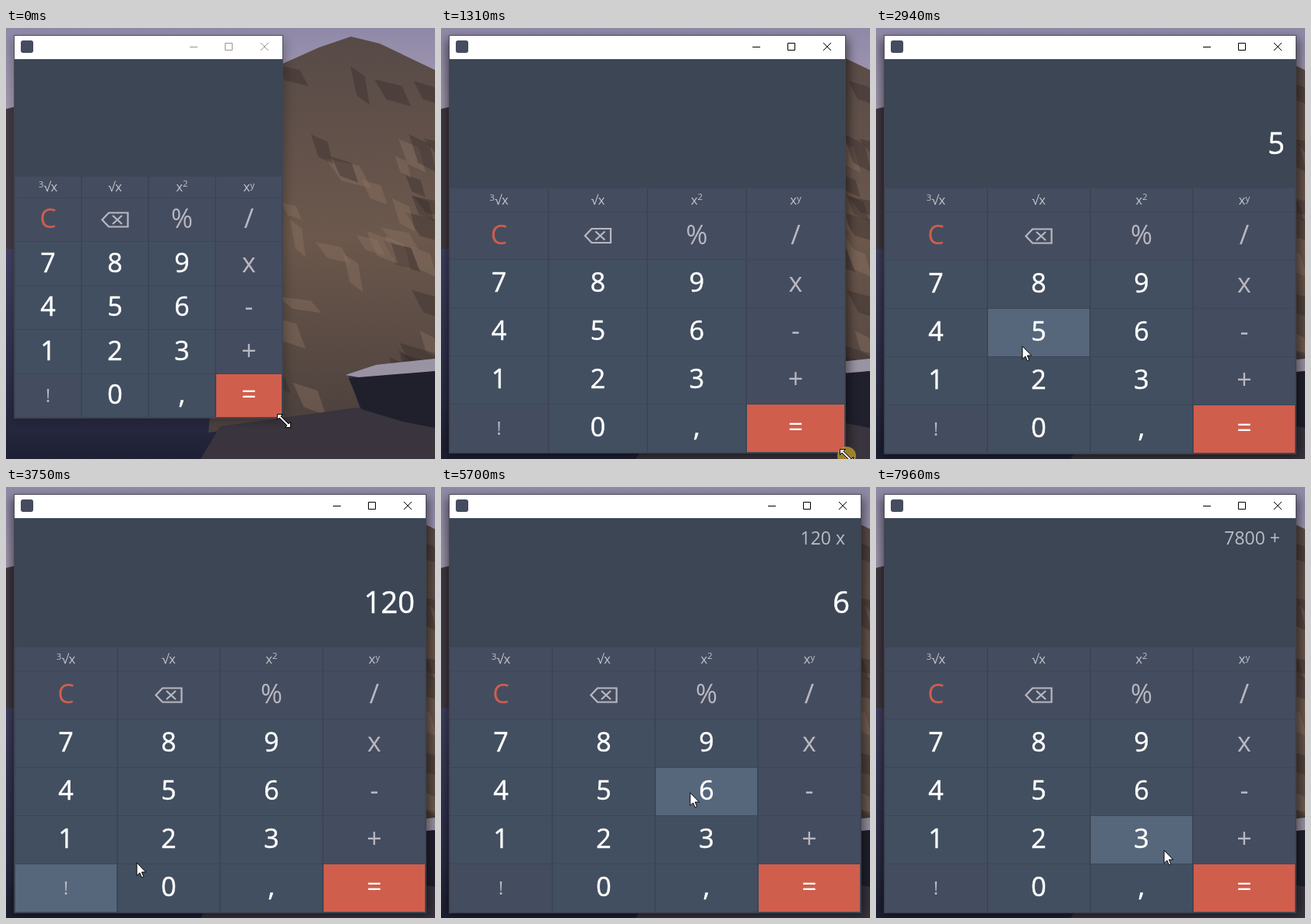
Animation, 551 px wide and 554 px high, one loop 8 s. Source, as an HTML page:

```html
<!DOCTYPE html>
<html lang="en">
<head>
<meta charset="utf-8">
<title>Calculator</title>
<style>
  html, body { margin: 0; width: 100%; height: 100%; overflow: hidden; background: #25273b; }
  svg { display: block; width: 551px; height: 554px; }
  text { font-family: "Open Sans", "Noto Sans", "DejaVu Sans", sans-serif; text-anchor: middle; }
  .end { text-anchor: end; }
</style>
</head>
<body>
<svg id="stage" viewBox="0 0 551 554" xmlns="http://www.w3.org/2000/svg">
  <defs>
    <linearGradient id="sky" x2="0" y2="1">
      <stop offset="0" stop-color="#8f89a8"/><stop offset="1" stop-color="#aca1b6"/>
    </linearGradient>
    <linearGradient id="sea" x2="0" y2="1">
      <stop offset="0" stop-color="#444366"/><stop offset=".75" stop-color="#2a2c46"/><stop offset="1" stop-color="#1d2033"/>
    </linearGradient>
    <linearGradient id="rock" x2="0" y2="1">
      <stop offset="0" stop-color="#574a47"/><stop offset=".5" stop-color="#6c584c"/><stop offset="1" stop-color="#4b403d"/>
    </linearGradient>
    <filter id="soft" x="-20%" y="-20%" width="140%" height="140%"><feGaussianBlur stdDeviation="7"/></filter>
    <clipPath id="slope"><use href="#hill"/></clipPath>
  </defs>
  <rect width="551" height="130" fill="url(#sky)"/>
  <path d="M0 104L60 90V290H0Z" fill="#443b44"/>
  <rect y="284" width="551" height="270" fill="url(#sea)"/>
  <path id="hill" d="M300 75L355 46 402 25 443 11 480 20 551 54V432L440 446 455 490 260 520Z" fill="url(#rock)"/>
  <g id="shards" clip-path="url(#slope)"></g>
  <path d="M436 446L475 433 551 425V441L470 452Z" fill="#9a93a3"/>
  <path d="M440 450L551 441V520L466 512Z" fill="#1f202c"/>
  <path d="M250 554L275 512 450 488 510 506 551 514V554Z" fill="#39343d"/>

  <rect id="shadow" x="7" y="14" filter="url(#soft)"/>
  <rect id="frame" x="10.5" y="9.5" fill="#3c4655" stroke="#454653" stroke-opacity=".75"/>
  <rect id="bar" x="11" y="10" height="30" fill="#fff"/>
  <rect x="19" y="16" width="16" height="16" rx="3" fill="#454c60"/>
  <path id="controls" fill="none" d="M-119 24.5h10M-73.5 19.5h9v9h-9zM-28 19l10 10M-18 19l-10 10"/>
  <g id="keys"></g>
  <text id="history" class="end" x="519" y="74" font-size="23" fill="#b9bcc5"></text>
  <text id="value" class="end" x="525" y="162" font-size="38" fill="#fff" stroke="#fff" stroke-width=".5"></text>
  <circle id="press" r="12" fill="#c9a52f" fill-opacity=".7"/>
  <path id="resize" fill="#fff" stroke="#000" d="M-8.5-8.5H-1.5L-4-6 6 4 8.5 1.5V8.5H1.5L4 6-6-4-8.5-1.5Z"/>
  <path id="arrow" fill="#fff" stroke="#000" d="M0 0V16.5L3.8 13 6.3 18.8 8.8 17.7 6.3 12H11.6Z"/>
</svg>
<script>
const LOOP = 8000;
const TICK = 56;
const CLICKING = 2010;      // the drag is over, the arrow takes over
const NS = "http://www.w3.org/2000/svg";
const $ = id => document.getElementById(id);

// Where the arrow goes, and what the display shows after the click there
const STOPS = [
  { leave: 2010, move: 0, x: 474, y: 513, history: "", value: "" },
  { leave: 2010, move: 560, x: 213, y: 384, history: "", value: "5" },
  { leave: 2870, move: 560, x: 82, y: 516, history: "", value: "120" },
  { leave: 3680, move: 560, x: 535, y: 340, history: "120 x", value: "" },
  { leave: 4490, move: 330, x: 335, y: 394, history: "120 x", value: "6" },
  { leave: 5590, move: 560, x: 254, y: 390, history: "120 x", value: "65" },
  { leave: 6740, move: 220, x: 470, y: 509, history: "120 x", value: "7800" },
  { leave: 7260, move: 200, x: 473, y: 452, history: "7800 +", value: "" },
  { leave: 7660, move: 280, x: 370, y: 467 }
];
const pressTime = stop => stop.leave + stop.move + 70;
const releaseTime = stop => pressTime(stop) + 120;

const ROWS = [
  ["3√x", "√x", "x2", "xy"], ["C", "⌫", "%", "/"], ["7", "8", "9", "x"],
  ["4", "5", "6", "-"], ["1", "2", "3", "+"], ["!", "0", ",", "="]
];
const raised = (s, dy) => `<tspan dy="${-dy}" font-size="11.5">${s}</tspan>`;
const SMALL = [
  raised("3", 5) + '<tspan dy="5">√x</tspan>', "√x", "x" + raised("2", 6), "x" + raised("y", 4)
];

const clamp = v => Math.max(0, Math.min(1, v));
const mix = (a, b, p) => a + (b - a) * p;
const easeOut = p => 1 - (1 - p) ** 2;
const ticksSince = (start, t) => Math.floor((t - start) / TICK);

function set(el, attrs) {
  for (const name in attrs) el.setAttribute(name, attrs[name]);
  return el;
}

function add(parent, tag, attrs) {
  return parent.appendChild(set(document.createElementNS(NS, tag), attrs));
}

function scatterShards() {
  let seed = 7;
  const random = () => (seed = seed * 16807 % 2147483647) / 2147483647;
  for (let i = 0; i < 40; i++) {
    const x = mix(350, 560, random()), y = mix(60, 490, random());
    const w = mix(10, 30, random()), h = mix(10, 26, random());
    add($("shards"), "path", {
      d: `M${x - w} ${y - h}L${x + w / 2} ${y - h / 2} ${x + w} ${y + h} ${x - w / 3} ${y + h / 2}Z`,
      fill: i % 2 ? "#8c7462" : "#352c2c", "fill-opacity": .4
    });
  }
}

function makeKey(label, row, col) {
  const rect = add($("keys"), "rect", {});
  const g = add($("keys"), "g", {});
  const small = row === 0, main = label === "=", bang = label === "!";
  const digit = row > 1 && col < 3 && !bang;
  const ink = label === "C" ? "#d05e4d" : digit || main ? "#fff" : small ? "#c4c3cb" : "#b9b7c1";
  if (label === "⌫") {
    add(g, "path", {
      d: "M-16.5-.5L-8-9.5H16.5V8.5H-8ZM-3-6L9 5M9-6L-3 5",
      fill: "none", stroke: ink, "stroke-width": 2.2
    });
  } else {
    const text = add(g, "text", {
      "font-size": small ? 16.5 : bang ? 24 : 34,
      y: small ? 5 : bang ? 8 : 10,
      fill: ink, stroke: ink, "stroke-width": digit ? .5 : 0
    });
    if (small) text.innerHTML = SMALL[col];
    else text.textContent = label;
  }
  return {
    rect, g, row, col,
    fill: main ? "#d05e4d" : digit ? "#424f60" : "#444d5f",
    hover: main ? "#e06d5c" : "#56677c"
  };
}

scatterShards();
const keys = ROWS.flatMap((row, r) => row.map((label, c) => makeKey(label, r, c)));

function pointerAt(t) {
  const i = Math.max(1, STOPS.findLastIndex(stop => stop.leave <= t));
  const from = STOPS[i - 1], to = STOPS[i];
  const p = easeOut(clamp(ticksSince(to.leave, t) * TICK / to.move));
  return [mix(from.x, to.x, p), mix(from.y, to.y, p)];
}

// Progress of a drag that grows the window by one step per tick
const drag = (start, steps, t) => t < start ? 0 : clamp((ticksSince(start, t) + 1) / steps);

function layout(right, bottom, hover) {
  const unit = (bottom - 40) / 16.35;
  const colX = col => Math.round(mix(11, right, col / 4));
  const rowY = row => Math.round(40 + unit * (row ? 4.35 + row * 2 : 5.35));
  for (const key of keys) {
    const x = colX(key.col), x2 = colX(key.col + 1);
    const y = rowY(key.row), y2 = rowY(key.row + 1);
    const over = hover && hover[0] >= x && hover[0] < x2 && hover[1] >= y && hover[1] < y2;
    set(key.rect, {
      x: x + 1, y, width: x2 - x - 2, height: y2 - y - 1, fill: over ? key.hover : key.fill
    });
    set(key.g, { transform: `translate(${(x + x2) / 2} ${(y + y2) / 2})` });
  }
}

function render(t) {
  const first = drag(520, 9, t), second = drag(1140, 8, t);
  const right = Math.round(355 + 143 * first + 41 * second);
  const bottom = Math.round(501 + 44 * (1 - (1 - first) ** 1.4) + 2 * second);
  const active = t >= 280;
  const sizing = t < CLICKING;
  const lead = first % 1 ? 7 : 2;
  const [x, y] = sizing ? [right + lead, bottom + Math.min(lead + 2, 5)] : pointerAt(t);

  set($("shadow"), {
    width: right - 3, height: bottom - 10, "fill-opacity": active ? .55 : .25
  });
  set($("frame"), { width: right - 10, height: bottom - 9 });
  set($("bar"), { width: right - 11 });
  set($("controls"), { transform: `translate(${right} 0)`, stroke: active ? "#000" : "#9b9490" });

  // Hover colour trails the arrow by one tick
  layout(right, bottom, sizing ? null : pointerAt(Math.max(CLICKING, t - TICK)));

  const shown = STOPS.findLast(stop => releaseTime(stop) <= t) || STOPS[0];
  $("history").textContent = shown.history;
  $("value").textContent = shown.value;

  const pressed = sizing ? active && t < 1840 :
    STOPS.some(stop => stop.move && t >= pressTime(stop) && t < releaseTime(stop));
  const place = (id, visible) => set($(id), {
    transform: `translate(${Math.round(x)} ${Math.round(y)})`,
    visibility: visible ? "visible" : "hidden"
  });
  place("press", pressed);
  place("resize", sizing);
  place("arrow", !sizing);
}

const began = performance.now();
function loop() {
  render((performance.now() - began) % LOOP);
  requestAnimationFrame(loop);
}
loop();
</script>
</body>
</html>
```
